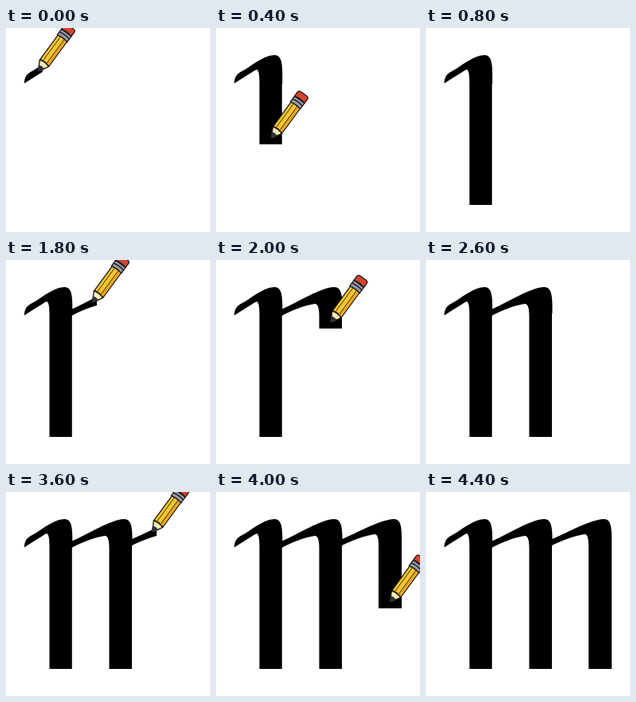
An HTML page for the animation above (6400 ms loop, 256x256 px).

```html
<!DOCTYPE html>
<html lang="en">
<head>
<meta charset="utf-8">
<title>Writing the letter m</title>
<style>
  html, body { margin: 0; width: 100%; height: 100%; overflow: hidden; background: #fff; }
  svg { display: block; width: 100vw; height: 100vh; }
</style>
</head>
<body>
<svg viewBox="0 0 256 256">
  <defs>
    <clipPath id="clip0"><rect width="256" height="256"/></clipPath>
    <clipPath id="clip1"><rect width="256" height="256"/></clipPath>
    <clipPath id="clip2"><rect width="256" height="256"/></clipPath>
  </defs>

  <path clip-path="url(#clip0)" d="M23 69.5C23 62 26 57 33 54C46 47 58 35 73 34C81 34 83.3 41 83.3 57V69L82.8 71V222H54.5V69C54.5 60 54 53 51 52Q47 54 23 69.5Z"/>
  <path clip-path="url(#clip1)" d="M82 62C105 52 130 35 148 34C156 34 158.5 41 158.5 57V66L158 68V222H129.5V70C129.5 61 128 55 124 55C110 57 96 63 82 70Z"/>
  <path clip-path="url(#clip2)" d="M157 59.5C180 50 205 35 223 34C231 34 233 41 233 57V222H204V68C204 59 203 53 199 53C185 55 171 61 157 67.5Z"/>

  <!-- Pencil lies along x with its point at the origin -->
  <g id="pencil">
    <g transform="rotate(-53.8)" stroke="#161616" stroke-width="1.3" stroke-linejoin="round">
      <path fill="#fbeeb0" d="M1 0L12.5 -6.3Q15 0 12.5 7.7L2 2Z"/>
      <path fill="#30323c" stroke="none" d="M0 0L7 -3.9Q8.5 0.5 7 5L1 2Z"/>
      <path fill="#fcc62e" d="M12.5 -6.3H52V7.7H12.5Q15 4.5 13.5 3Q15.5 0 13.5 -2.5Q15 -4.5 12.5 -6.3Z"/>
      <path fill="#eda522" stroke="none" d="M14 3.6H51.5V7H14Z"/>
      <path fill="none" stroke-width=".8" d="M14 -2.5H52M14 3.2H52"/>
      <path fill="#9798a6" d="M51 -7.2H60V8.2H51Q53 .5 51 -7.2ZM55.5 -7.2Q57.5 .5 55.5 8.2"/>
      <path fill="#d7432e" d="M60 -7.2H66Q69 -7.2 69 -4V5Q69 8.2 66 8.2H60Q62 .5 60 -7.2Z"/>
    </g>
  </g>
</svg>
<script>
const LOOP = 6400, STROKE_GAP = 1800, STEP = 100, STEPS = 8;
const starts = [[40, 54], [108, 53], [183, 50]];
const stemX = [69, 143.5, 218];
const stemY = [78, 108, 138, 162, 185, 215];

const pencil = document.getElementById('pencil');
const clips = [0, 1, 2].map(i => document.querySelector(`#clip${i} rect`));

function tipAt(stroke, step) {
  if (step === 0) return starts[stroke];
  if (step === 1) return [stemX[stroke] - 6, 47];
  return [stemX[stroke], stemY[step - 2]];
}

function setClip(rect, width, height) {
  rect.setAttribute('width', width);
  rect.setAttribute('height', height);
}

function draw(time) {
  const t = time % LOOP;
  let writing = false;
  clips.forEach((rect, stroke) => {
    const step = Math.floor((t - stroke * STROKE_GAP) / STEP);
    if (step < 0) return setClip(rect, 0, 0);
    if (step >= STEPS) return setClip(rect, 256, 256);
    const [x, y] = tipAt(stroke, step);
    // The hump is revealed sideways, the stem downwards.
    if (step < 2) setClip(rect, x + 6, 70);
    else setClip(rect, 256, y + 8);
    pencil.setAttribute('transform', `translate(${x} ${y})`);
    writing = true;
  });
  pencil.setAttribute('visibility', writing ? 'visible' : 'hidden');
}

const begin = performance.now();
function tick() {
  draw(performance.now() - begin);
  requestAnimationFrame(tick);
}
tick();
</script>
</body>
</html>
```
